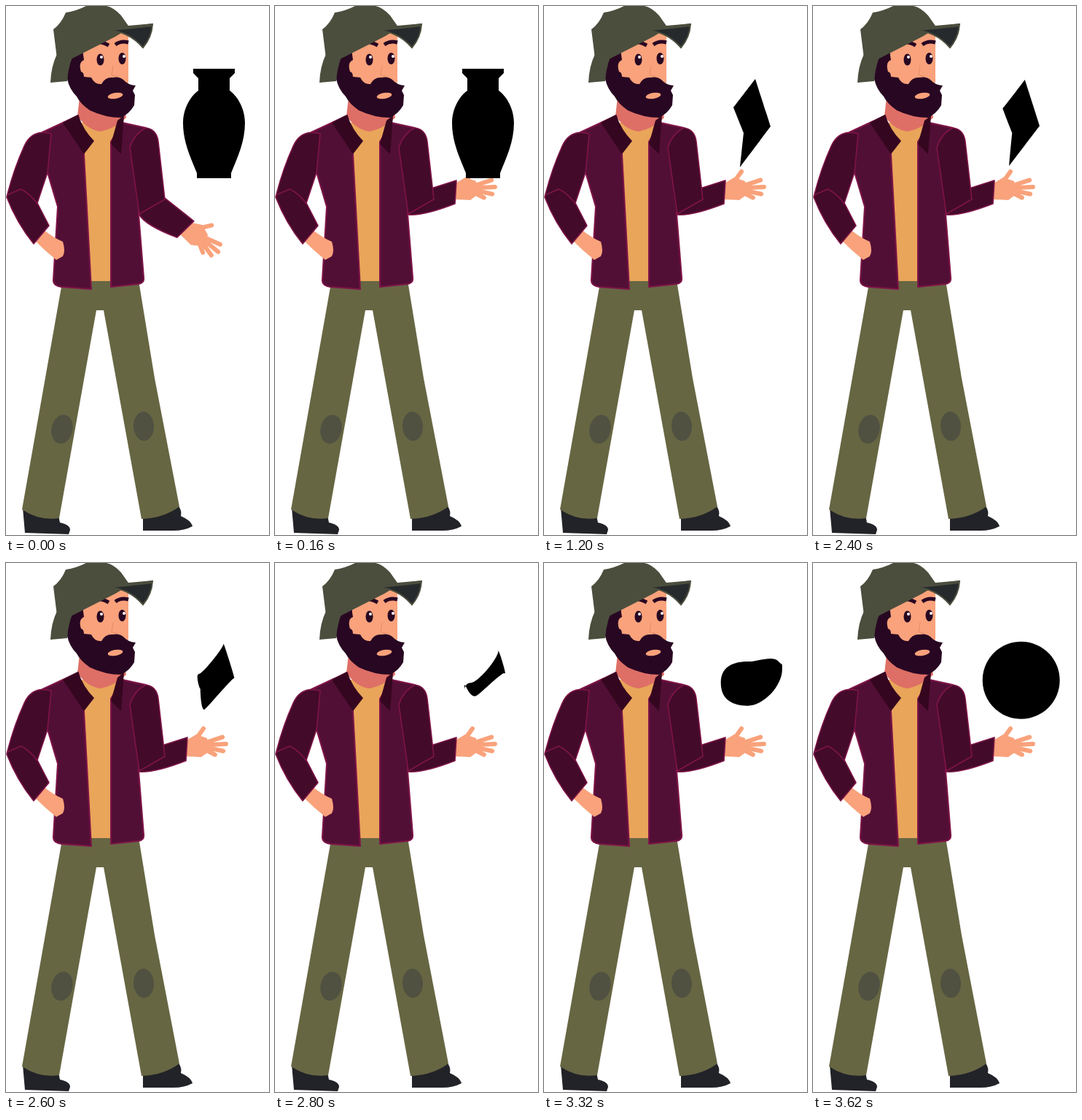
An HTML page that plays this animation: 361 px wide and 725 px high, repeating every 4.76 s.

```html
<!DOCTYPE html>
<html lang="en">
<head>
<meta charset="utf-8">
<title>Man with a changing shape</title>
<style>
  html, body { margin: 0; width: 100%; height: 100%; overflow: hidden; background: #fff; }
  svg { display: block; width: 100vw; height: 100vh; }
  .coat { fill: #520f36; stroke: #7e1447; stroke-width: 2; stroke-linejoin: round; }
  .sleeve { fill: #430a2a; stroke: #7e1447; stroke-width: 1.6; stroke-linejoin: round; }
  .collar { fill: #35061f; }
  .skin { fill: #f9a27b; }
  .hair { fill: #280722; }
  .brow { fill: none; stroke: #280722; stroke-width: 5; }
  .pants { fill: #676643; }
  .patch { fill: #505141; }
  .boot { fill: #222328; }
  .hat { fill: #4b4e3d; }
  .line { fill: none; stroke-linecap: round; stroke-linejoin: round; }
</style>
</head>
<body>
<svg viewBox="0 0 361 725">
  <!-- boots and trousers -->
  <path class="boot" d="M23 688 L72 698 L74 708 Q88 711 88 718 L86 724 L26 722Z"/>
  <path class="boot" d="M188 698 L236 684 Q242 692 240 699 Q254 705 256 713 Q245 719 230 719 L188 719Z"/>
  <path class="pants" d="M78 376 L182 376 L204 510 L238 686 Q216 702 186 703 L134 417 L124 417 L73 702 Q46 706 22 690 L76 385Z"/>
  <ellipse class="patch" cx="77" cy="580" rx="14.500" ry="20" transform="rotate(12 77 580)"/>
  <ellipse class="patch" cx="189" cy="576" rx="14" ry="20" transform="rotate(-3 189 576)"/>

  <!-- shirt and neck -->
  <path fill="#e9a55a" d="M103 160 L158 160 L147 377 L116 377Z"/>
  <path fill="#de6f66" d="M101 125 L98 151 Q112 170 130 172 Q150 168 165 153 L160 130Z"/>

  <!-- coat -->
  <path class="coat" d="M50 173 L78 160 L99 150 L106 185 L117 388 L76 385 Q64 383 65 375 L71 275 L57 228Z"/>
  <path class="skin" d="M39 321 L52 307 Q66 318 78 323 Q82 336 78 343 L69 348 Q54 336 39 321Z"/>
  <path class="sleeve" d="M62 175 Q36 168 25 192 Q10 225 1 262 Q15 298 38 326 L59 301 L43 270 L57 228Z"/>
  <path class="line" stroke="#7e1447" stroke-width="1.600" d="M2 259 L20 251 Q32 256 43 271"/>
  <path class="coat" d="M144 186 L160 160 L192 167 L182 285 L189 372 Q190 380 182 381 L144 385Z"/>
  <path class="collar" d="M99 149 L78 160 L107 203 L121 185Q106 170 99 149Z"/>
  <path class="collar" d="M162 150 L153 157 L144 189 L158 203Z"/>

  <!-- moving arm -->
  <g id="hand">
    <path class="skin" d="M246 244 L261 235 L276 240 L279 258 L268 266 L246 265Z"/>
    <path class="line" id="fingers" stroke="#f9a27b" stroke-width="6"/>
  </g>
  <path class="sleeve" id="forearm"/>
  <path class="sleeve" d="M170 194 Q176 175 192 167 Q207 169 209 186 L218 265 L183 285Z"/>

  <!-- head -->
  <path class="skin" d="M95 60 Q120 25 168 34 L168 105 L150 115 L103 110Z"/>
  <path class="hair" d="M112 40 Q103 56 107 74 Q99 77 103 90 Q107 91 107 97 L117 98 Q122 108 131 107
    Q136 97 147 98 Q155 96 161 101 Q167 108 178 109 L174 116 L177 122 L176 136 Q170 147 158 153
    Q136 153 115 143 Q102 134 97 124 Q87 114 84 100 Q80 70 96 50Z"/>
  <ellipse class="skin" cx="150" cy="123" rx="10.500" ry="4" transform="rotate(-10 150 123)"/>
  <path class="line" stroke="#e58d69" stroke-width="1" d="M147 82 L145 94 Q148 97 152 96"/>
  <ellipse class="hair" cx="129.500" cy="73.500" rx="5" ry="8"/>
  <ellipse class="hair" cx="159.500" cy="72" rx="5" ry="8"/>
  <circle cx="131" cy="70" r="2" fill="#fff"/>
  <circle cx="162" cy="69" r="2" fill="#fff"/>
  <path class="brow" d="M118 53 Q127 46 141 54"/>
  <path class="brow" d="M150 53 Q158 47 168 50"/>

  <!-- hat -->
  <path class="hat" d="M70 72 L65 32 Q76 24 82 9 Q96 7 110 0 L138 0 Q148 2 158 13 L170 30 L150 42 L85 75Z"/>
  <path fill="#272a2c" stroke="#4b4e3d" stroke-width="2" d="M138 33 Q165 30 201 25 Q200 43 188 57 Q168 34 138 33Z"/>
  <path class="hat" d="M61 105 Q62 82 70 66 Q105 36 168 27 L202 24 L200 28 Q160 33 138 34 Q110 38 98 57 Q86 75 84 103Z"/>

  <path id="shape"/>
</svg>
<script>
const LOOP = 4760, STEP = 20;
const PIVOT = [180.7, 278.4], DROP = 42;
const el = id => document.getElementById(id);
const clamp = v => Math.min(1, Math.max(0, v));
const lerp = (a, b, t) => a.map((v, i) => v + (b[i] - v) * t);
const rad = deg => deg * Math.PI / 180;

// A node is [x, y, inX, inY, outX, outY]; handles are relative.
const node = (x, y, into = [0, 0], out = [0, 0]) => [x, y, ...into, ...out];
const mirror = ([x, y, ix, iy, ox, oy]) => [571 - x, y, -ox, oy, -ix, iy];

// Vase: left profile from belly to lip, its mirror, then the base corners.
const base = [node(262, 236), node(262, 229, [0, 0], [-9, -22])];
const body = [
  node(243, 160, [0, 26], [0, -22]),
  node(264, 116, [-8, 5]),
  node(264, 99),
  node(257, 92),
  node(257, 86)
];
const flip = list => list.map(mirror).reverse();
const vase = [...body, ...flip(body), ...flip(base), ...base];

// Blade corners, clockwise from the left one.
const corners = [[260, 139], [290, 100], [311, 165], [269, 221], [274, 174]];
const blade = corners.map(p => node(...p));

// The same outline with each edge cut into equal parts, one point per vase node.
const bladeFine = [3, 3, 3, 1, 4].flatMap((parts, i) =>
  Array.from({ length: parts }, (_, k) =>
    node(...lerp(corners[i], corners[(i + 1) % corners.length], k / parts))));

// Counter-clockwise arcs between the given angles.
function makeDisc(cx, cy, r, angles) {
  const n = angles.length;
  const handle = deg => 4 / 3 * Math.tan(rad((deg + 360) % 360) / 4) * r;
  return angles.map((deg, i) => {
    const c = Math.cos(rad(deg)), s = Math.sin(rad(deg));
    const a = handle(angles[(i + n - 1) % n] - deg);
    const b = handle(deg - angles[(i + 1) % n]);
    return node(cx + r * c, cy + r * s, [-s * a, c * a], [s * b, -c * b]);
  });
}
const disc = makeDisc(285.7, 160.7, 53, [90, 0, -43, -90, -180]);

const morph = (a, b, t) => a.map((p, i) => lerp(p, b[i], t));

function outline(nodes) {
  const curves = nodes.map((p, i) => {
    const q = nodes[(i + 1) % nodes.length];
    return `C${p[0] + p[4]} ${p[1] + p[5]} ${q[0] + q[2]} ${q[1] + q[3]} ${q[0]} ${q[1]}`;
  });
  return `M${nodes[0][0]} ${nodes[0][1]}${curves.join('')}Z`;
}

// Thumb, then four fingers fanned out from the palm.
function fingerPath() {
  let d = 'M261 241 L271 227';
  for (let i = 0; i < 4; i++) {
    const a = rad(15 * i - 18), len = 40 - 3 * (i - 1) ** 2;
    d += `M262 250 l${len * Math.cos(a)} ${len * Math.sin(a)}`;
  }
  return d;
}
el('fingers').setAttribute('d', fingerPath());

function turn([x, y], deg) {
  const c = Math.cos(rad(deg)), s = Math.sin(rad(deg));
  const dx = x - PIVOT[0], dy = y - PIVOT[1];
  return [PIVOT[0] + dx * c - dy * s, PIVOT[1] + dx * s + dy * c];
}

function draw(now) {
  const ms = Math.floor(now % LOOP / STEP) * STEP;

  const angle = DROP * (1 - clamp(ms / 160));
  el('hand').setAttribute('transform', `rotate(${angle} ${PIVOT})`);
  const [bend, low, high] = [[203, 288], [247, 271], [249, 239]].map(p => turn(p, angle));
  el('forearm').setAttribute('d', `M205 253 L${high} L${low} Q${bend} 183 286Z`);

  const nodes = ms < 2400
    ? morph(vase, bladeFine, clamp((ms - 680) / 520))
    : morph(blade, disc, clamp((ms - 2380) / 1240));
  el('shape').setAttribute('d', outline(nodes));
}

const start = performance.now();
function tick() {
  draw(performance.now() - start);
  requestAnimationFrame(tick);
}
tick();
</script>
</body>
</html>
```
